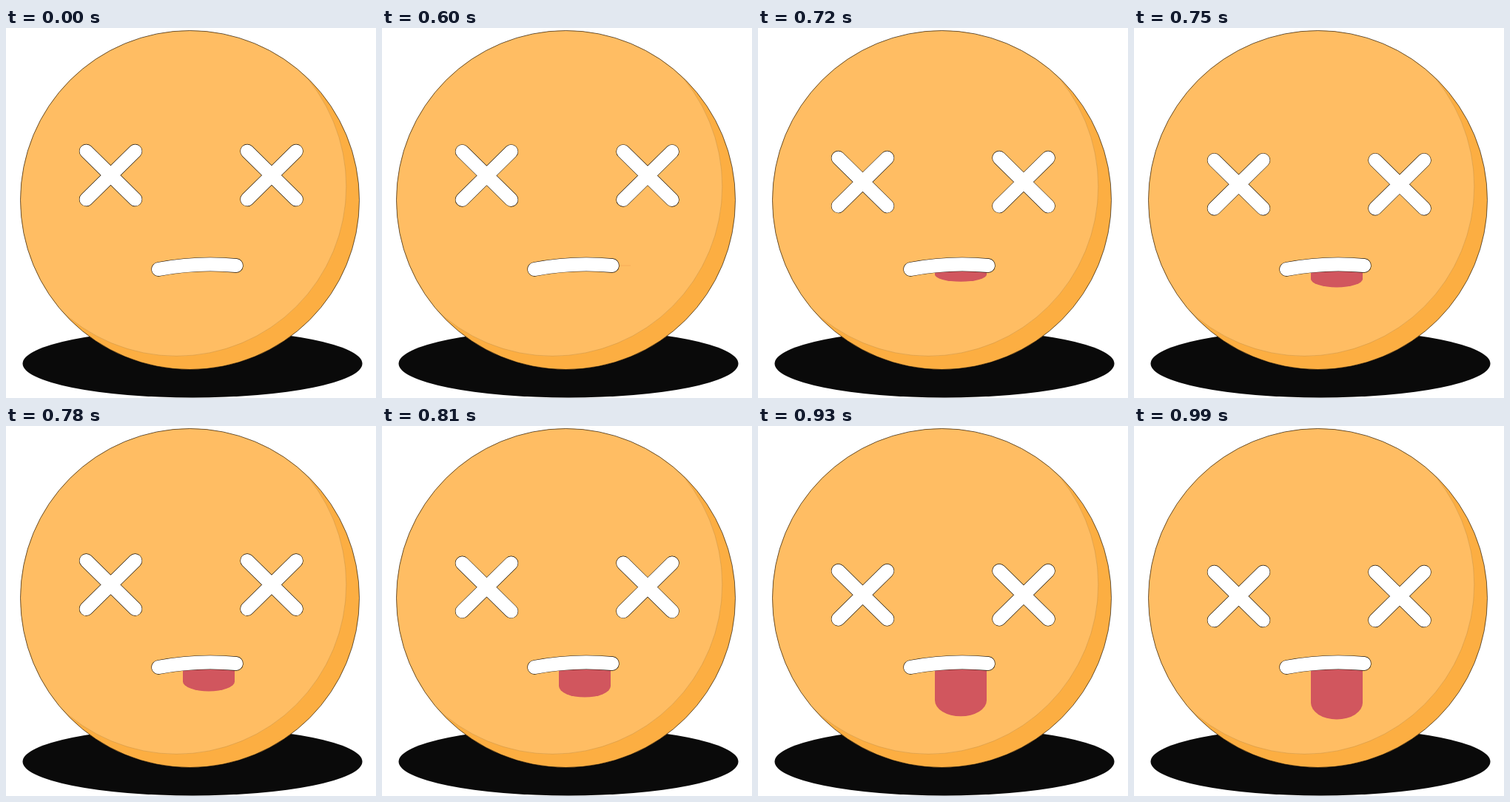
Animation, 500 px wide and 500 px high, one loop 1410 ms. Source, as an HTML page:

```html
<!DOCTYPE html>
<html lang="en">
<head>
<meta charset="utf-8">
<title>Dizzy face</title>
<style>
  html, body { margin: 0; width: 100%; height: 100%; overflow: hidden; background: #fff; }
  svg { display: block; width: 100%; height: 100%; }
  .pen { fill: none; stroke-linecap: round; stroke-linejoin: round; }
  .edge { stroke: #1c1206; stroke-width: 19.4; }
  .white { stroke: #fff; stroke-width: 18.2; }
</style>
</head>
<body>
<svg viewBox="0 0 500 500">
  <defs>
    <clipPath id="ball"><circle cx="248.5" cy="232.5" r="229"/></clipPath>
    <path id="cross" d="M-33-32.5L33 32.5M33-32.5L-33 32.5"/>
    <path id="lips" d="M206 326Q258.5 316 311 321"/>
    <g id="eye">
      <use href="#cross" class="pen edge"/>
      <use href="#cross" class="pen white"/>
    </g>
  </defs>
  <ellipse cx="252" cy="453.5" rx="229.5" ry="46" fill="#0a0a0a"/>
  <circle cx="248.5" cy="232.5" r="229" fill="#fcae42"/>
  <circle cx="230.5" cy="214" r="229.3" fill="#ffbd63" stroke="#b9873f" stroke-opacity=".5" stroke-width=".8" clip-path="url(#ball)"/>
  <circle cx="248.5" cy="232.5" r="229" fill="none" stroke="#000" stroke-opacity=".65" stroke-width=".9"/>
  <path id="glint" d="M318 321H336" stroke="#f8ae58" stroke-width="1"/>
  <path id="tongue" fill="#d1565e"/>
  <use href="#lips" class="pen edge"/>
  <use href="#lips" class="pen white"/>
  <g id="eyes">
    <use href="#eye" x="141.5" y="199"/>
    <use href="#eye" x="359" y="199"/>
  </g>
</svg>
<script>
const LOOP = 1410, HOLD = 600, STEP = 30, STEPS = 14;
const [eyes, tongue, glint] = ['eyes', 'tongue', 'glint'].map(id => document.getElementById(id));
const smooth = p => p * p * (3 - 2 * p);

function tonguePath(e) {
  if (!e) return '';
  const top = 320.5, bottom = top + 76 * e;
  const ry = Math.min(4 + 18.5 * e, bottom - top);
  const side = bottom - ry;
  return `M239 ${top}V${side}A35 ${ry} 0 0 0 309 ${side}V${top}Z`;
}

function draw(t) {
  const n = t < HOLD ? 0 : Math.min(STEPS, Math.floor((t - HOLD) / STEP) + 1);
  const e = smooth(n / STEPS);
  eyes.setAttribute('transform', `translate(0 ${31 * e})`);
  tongue.setAttribute('d', tonguePath(e));
  glint.setAttribute('visibility', n === 1 ? 'visible' : 'hidden');
}

let start;
function tick(now) {
  start ??= now;
  draw((now - start) % LOOP);
  requestAnimationFrame(tick);
}
draw(0);
requestAnimationFrame(tick);
</script>
</body>
</html>
```
